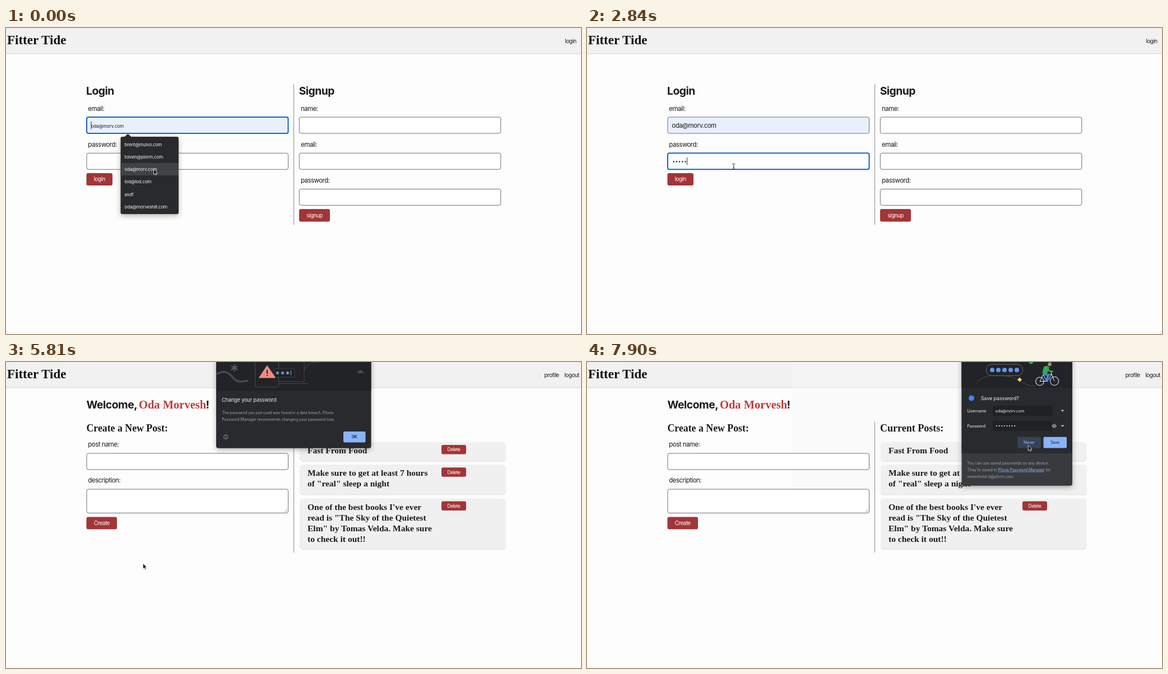
Recreate the animation shown at these times as an HTML page. Size 1026x546 px, loop 8000 ms.

```html
<!DOCTYPE html>
<html lang="en">
<head>
<meta charset="utf-8">
<title>Login demo</title>
<style>
html, body { margin: 0; width: 100%; height: 100%; overflow: hidden; background: #fdfdfd; }
svg {
  position: absolute; left: 0; top: 0; width: 1026px; height: 546px;
  font-family: Inter, Roboto, sans-serif; letter-spacing: -.03em; fill: #1a1a1a;
}
.serif { font-family: "Liberation Serif", serif; font-weight: 700; letter-spacing: 0; }
.bold { font-weight: 700; }
.mid { text-anchor: middle; }
.field { fill: #fff; stroke: #707070; stroke-width: 1; }
.filled { fill: #e8f0fe; }
.focus { stroke: #1266c4; stroke-width: 2; }
.popup { letter-spacing: -.01em; filter: drop-shadow(0 3px 5px rgba(0, 0, 0, .3)); }
.line { fill: none; stroke: #46494d; }
#breach { transform-origin: 513px 154px; }
</style>
</head>
<body>
<svg id="page"></svg>
<svg id="breach"></svg>
<svg id="top"></svg>
<script>
const LOOP = 8000;
const RED = '#a23538', BLUE = '#8ab4f8', DARK = '#202124', PANEL = '#292a2d', PALE = '#e8eaed', GREY = '#9aa0a6';
const EMAIL = 'oda@morv.com';
const $ = id => document.getElementById(id);

const text = (x, y, size, str, attrs = '') =>
  `<text x="${x}" y="${y}" font-size="${size}" ${attrs}>${str}</text>`;
const rect = (x, y, w, h, attrs = '') =>
  `<rect x="${x}" y="${y}" width="${w}" height="${h}" ${attrs}/>`;
const circle = (x, y, r, attrs = '') => `<circle cx="${x}" cy="${y}" r="${r}" ${attrs}/>`;
const path = (d, attrs = '') => `<path d="${d}" ${attrs}/>`;
const repeat = (n, make) => Array.from({ length: n }, (_, i) => make(i)).join('');

const serif = (x, y, size, str, attrs = '') => text(x, y, size, str, `class="serif" ${attrs}`);
const label = (x, y, str) => text(x, y, 11.4, str);
const heading = (x, y, str) => text(x, y, 19.3, str, 'class="bold"');
const field = (x, y, h = 29, attrs = '') =>
  rect(x, y, 359.5, h, `rx="3" class="field" ${attrs}`);
const button = (x, y, w, h, size, str, attrs = '') =>
  rect(x, y, w, h, `rx="3" fill="${RED}" ${attrs}`) +
  text(x + w / 2, y + h / 2 + size * .35, size, str, 'class="mid" fill="#fff"');
const divider = (y1, y2) => path(`M513.5 ${y1}V${y2}`, 'stroke="#8c8c8c"');

function header() {
  return rect(0, 0, 1026, 46, 'fill="#f1f1f1"') +
    path('M0 45.8H1026', 'stroke="#cfcfcf"') +
    rect(366, 0, 512, 235, 'id="haze" fill="#f8f8f8" opacity=".5"') +
    serif(2, 28.5, 23, 'Fitter Tide', 'fill="#111"');
}

function authPage() {
  return text(997.5, 26.6, 9.9, 'login') + divider(100, 351) +
    heading(143, 119, 'Login') +
    label(146.3, 147.5, 'email:') + field(144, 159, 29, 'id="email"') +
    text(151.5, 178, 8, EMAIL, 'id="preview" letter-spacing="-.01em"') +
    text(151.3, 177.6, 11.4, EMAIL, 'id="value"') +
    label(146.3, 211.7, 'password:') + field(144, 223.3, 29, 'id="password"') +
    `<g id="dots">${repeat(8, i => circle(154.6 + 5.2 * i, 238.6, 1.25))}</g>` +
    button(143.5, 259, 46.5, 22, 9.9, 'login', 'id="submit"') +
    rect(0, 0, .9, 13.5, 'id="caret"') +
    heading(522.7, 119, 'Signup') +
    ['name:', 'email:', 'password:'].map((name, i) =>
      label(526, 147.5 + 64.2 * i, name) + field(523.3, 159 + 64.2 * i)).join('') +
    button(523, 323, 55, 22.5, 9.9, 'signup');
}

function menu() {
  const items = ['brent@mulvo.com', 'tolven@plorm.com', EMAIL, 'lod@lod.com', 'asdf', 'oda@morveshill.com'];
  return `<g id="menu" class="popup">` +
    path('M211 194.5L217.5 189L224 194.5Z', `fill="${PANEL}"`) +
    rect(204.5, 194, 103.5, 138, `rx="3" fill="${PANEL}"`) +
    rect(204.5, 241, 103.5, 22, 'fill="#414245"') +
    items.map((s, i) => text(211.5, 211 + 22.15 * i, 8, s, 'fill="#f1f1f1"')).join('') + '</g>';
}

function post(y, h, lines) {
  return rect(524, y + 1, 368, h, 'rx="6" fill="#dcdcdc"') +
    rect(524, y, 368, h, 'rx="6" fill="#f0f0f0"') +
    lines.map((s, i) => serif(538, y + 20 + 19.1 * i, 15.5, s)).join('') +
    button(777, y + 5, 44, 16.5, 8.5, 'Delete');
}

function homePage() {
  return text(960.5, 26.6, 9.9, 'profile') + text(996.3, 26.6, 9.9, 'logout') + divider(107, 340) +
    heading(143.5, 82.7, 'Welcome,') +
    serif(237, 82.5, 20.5, 'Oda Morvesh', 'fill="#c23a3c"') + heading(356.5, 82.7, '!') +
    serif(143.5, 124, 17.8, 'Create a New Post:') +
    label(146.3, 151.3, 'post name:') + field(144, 163) +
    label(146.3, 215.4, 'description:') + field(144, 227, 42.5) +
    path('M497 268L502 263M500 268L502 266', 'stroke="#777" stroke-width=".7"') +
    button(143.5, 276.5, 54.5, 22, 9.9, 'Create') +
    serif(523, 124, 18, 'Current Posts:') +
    post(143, 33.5, ['Fast From Food']) +
    post(183.3, 53, ['Make sure to get at least 7 hours', 'of "real" sleep a night']) +
    post(243.5, 90, ["One of the best books I've ever", 'read is "The Sky of the Quietest',
      'Elm" by Tomas Velda. Make sure', 'to check it out!!']);
}

const star = (x, y, r, color, w) => path(repeat(3, i => {
  const a = Math.PI * (i / 3 + .5), dx = r * Math.cos(a), dy = r * Math.sin(a);
  return `M${x - dx} ${y - dy}L${x + dx} ${y + dy}`;
}), `stroke="${color}" stroke-width="${w}"`);

function breachDialog() {
  return `<g class="popup">` +
    rect(375, -8, 276.5, 161.7, `rx="4" fill="${PANEL}"`) + rect(375, 0, 276.5, 51.5, 'fill="#222326"') +
    star(407.5, 10.5, 6.5, '#5a5d61', 2.2) +
    path('M375 22C392 12 400 22 406 29S420 36 432 33', 'class="line" stroke-width="3.5"') +
    path('M444.5 -4V41Q444.5 45 448 45H483Q486.5 45 486.5 41V-4M486 35H532V-4M486 38.5H540M532 14Q538 -1 560 0', 'class="line"') +
    path('M627 20A5.5 5.5 0 0 1 638 20Z', 'fill="#46494d"') +
    rect(478, 12, 37, 15, 'rx="1" fill="#202124" stroke="#3c4043"') +
    path('M466 6.5L451.5 28H480.5Z', 'fill="#f28b82" stroke="#f28b82" stroke-linejoin="round"') +
    path('M466 14V21M466 23V25', `stroke="${DARK}" stroke-width="2"`) +
    repeat(3, i => star(484.5 + 9 * i, 19.5, 3, BLUE, 1.2)) + path('M508.5 15.5V23.5', `stroke="${BLUE}"`) +
    text(385, 71, 9.2, 'Change your password', `fill="${PALE}"`) +
    text(385.3, 93, 7, 'The password you just used was found in a data breach. Plovia', `fill="${GREY}"`) +
    text(385.3, 105.3, 7, 'Password Manager recommends changing your password now.', `fill="${GREY}"`) +
    circle(392.3, 133.7, 3.8, `fill="none" stroke="${GREY}" stroke-width=".9"`) +
    path('M392.3 133V136M392.3 131.3V132.2', `stroke="${GREY}"`) +
    rect(602, 124, 39.5, 19.5, `rx="2" fill="${BLUE}"`) +
    text(621.7, 136.3, 7, 'OK', `class="mid bold" fill="#25334d"`) + '</g>';
}

function cyclist() {
  return circle(808, 34.5, 7.3, 'fill="none" stroke="#aecbfa" stroke-width="1.3"') +
    circle(834, 34, 7.6, 'fill="none" stroke="#aecbfa" stroke-width="1.3"') +
    path('M808 34.5L814 23L829 22L834 34M814 23L821 35L829 22L828 17H832M808 34.5H821', 'fill="none" stroke="#e8eaed"') +
    path('M814 20L823 24L819 34', 'fill="none" stroke="#4285f4" stroke-width="3.5" stroke-linejoin="round"') +
    path('M812 20L815 9Q821 4 825 10L821 21Z', 'fill="#34a853"') +
    path('M821 11L825 16L831 17', 'fill="none" stroke="#34a853" stroke-width="2.5"') +
    circle(825.5, 4, 3.2, 'fill="#c58a70"') + path('M822 3Q825 -2 829 2Z', 'fill="#34a853"');
}

function saveDialog() {
  const down = y => path(`M845.8 ${y - 1.2}H851.2L848.5 ${y + 1.6}Z`, `fill="${PALE}"`);
  const input = y => rect(724, y, 107, 18, `rx="2" fill="${DARK}"`);
  return `<g id="save" class="popup">` +
    rect(668.5, -8, 197.5, 228.7, 'rx="4" fill="#393a3d"') +
    rect(668.5, 0, 197.5, 163, `fill="${PANEL}"`) + rect(668.5, 0, 197.5, 46, 'fill="#222326"') +
    path('M694 40C702 24 724 22 748 25S775 42 799 43', 'class="line"') +
    rect(712.5, 4, 65, 20.5, 'rx="10" fill="#222326" stroke="#6b6f74"') +
    repeat(5, i => circle(723 + 11 * i, 14.3, 4, 'fill="#5f97f0"')) +
    path('M772 27.5L776 31.5L772 35.5L768 31.5Z', 'fill="#fdd663"') +
    path('M789 0A3 3 0 0 0 796 0Z', 'fill="#34a853"') + cyclist() +
    circle(686, 64.5, 5, 'fill="#4285f4"') +
    text(702.7, 68, 9.1, 'Save password?', `fill="${PALE}"`) +
    text(678.3, 89.5, 7.3, 'Username', `fill="${PALE}"`) + input(78) + down(87) +
    text(728.6, 89.5, 7.2, EMAIL, `fill="${PALE}"`) +
    text(678.3, 116.5, 7.3, 'Password', `fill="${PALE}"`) + input(105) + down(114) +
    repeat(8, i => circle(731 + 4.6 * i, 114, 1.1, `fill="${PALE}"`)) +
    path('M829 114Q833.5 107 838 114Q833.5 121 829 114Z', `fill="${GREY}"`) +
    circle(833.5, 114, 1.7, `fill="${GREY}" stroke="${DARK}" stroke-width=".8"`) +
    rect(768.3, 134, 41.2, 19.2, 'id="never" rx="2" stroke="#3c4043" stroke-width=".8"') +
    text(788.8, 146.2, 7.2, 'Never', `class="mid" font-weight="500" fill="${BLUE}"`) +
    rect(814.5, 133.7, 41.5, 19.8, `rx="2" fill="${BLUE}"`) +
    text(835, 146.2, 7.2, 'Save', `class="mid" font-weight="500" fill="#25334d"`) +
    text(678.3, 182.5, 7.1, 'You can use saved passwords on any device.', `fill="${GREY}"`) +
    text(678.3, 194.7, 7.1, `They're saved to <tspan fill="${BLUE}" text-decoration="underline">Plovia Password Manager</tspan> for`, `fill="${GREY}"`) +
    text(678.3, 207, 7.1, 'marenholst.ti@plorm.com.', `fill="${GREY}"`) + '</g>';
}

$('page').innerHTML = header() + `<g id="auth">${authPage()}${menu()}</g><g id="home">${homePage()}</g>`;
$('breach').innerHTML = breachDialog();
$('top').innerHTML = saveDialog() + '<g id="cursor">' +
  path('M0 0V9.7L2.2 7.7L3.6 10.9L5.2 10.2L3.8 7.1H6.8Z', 'id="arrow" fill="#000" stroke="#fff" stroke-width=".8"') +
  path('M-2.6 -5Q0 -5 0 -3.4Q0 -5 2.6 -5M0 -3.4V3.4M-2.6 5Q0 5 0 3.4Q0 5 2.6 5M-1.2 1.8H1.2',
    'id="beam" fill="none" stroke="#222" stroke-width=".9"') + '</g>';

// time, x, y, shape
const POINTER = [
  [0, 263.7, 251.7, 'arrow'], [600, 264, 253, 'beam'], [890, 263, 250, 'beam'], [1040, 261.7, 247, 'beam'],
  [4030, 250, 262, 'arrow'], [4180, 215, 284, 'arrow'], [4330, 180, 283, 'arrow'], [4480, 165.7, 272.3, 'arrow'],
  [5510, 190, 305, 'arrow'], [5660, 217, 335, 'arrow'], [5810, 244.6, 359.5, 'arrow'], [5960, 330, 415, 'arrow'],
  [6110, 440, 428, 'arrow'], [6260, 550, 395, 'arrow'], [6400, 645, 300, 'arrow'], [6550, 678, 200, 'arrow'],
  [6700, 645, 145, 'arrow'], [6850, 625, 133, 'arrow'], [7000, 660, 128, 'arrow'], [7150, 767.8, 107.5, 'arrow'],
  [7300, 778, 117, 'arrow'], [7450, 784, 128, 'arrow'], [7600, 786, 138, 'arrow'], [7750, 787, 145, 'arrow'],
  [7900, 787.3, 148.5, 'arrow']
];
const KEYS = [1940, 2240, 2390, 2690, 2840, 3140, 3430, 3580];
const MENU_FADE = [[0, 1], [450, .5], [600, 0]];
// time, opacity, lift, tilt
const BREACH = [[0, 0, 0, 0], [5510, .5, 0, 0], [5660, 1, 0, 0], [7000, .75, -5, 4], [7150, .4, -9, 8], [7300, .15, -13, 11], [7450, 0, 0, 0]];
const CARET_OFF = [[1790, 1940], [4030, 4480], [4620, LOOP]];

const at = (table, t) => table.findLast(row => row[0] <= t);
const show = (id, on) => { $(id).style.display = on ? '' : 'none'; };

function render(t) {
  const typed = KEYS.filter(k => k <= t).length;
  const picked = t >= 450, inPassword = t >= 1190;

  show('auth', t < 5210);
  show('home', t >= 5210);
  show('haze', t >= 6700);
  show('preview', !picked);
  show('value', picked);
  $('email').setAttribute('class', 'field filled' + (inPassword ? '' : ' focus'));
  $('password').setAttribute('class', 'field' + (inPassword && t < 4620 ? ' focus' : ''));
  $('submit').setAttribute('fill', t >= 4480 ? '#89272b' : RED);
  [...$('dots').children].forEach((dot, i) => { dot.style.display = i < typed ? '' : 'none'; });

  show('caret', !CARET_OFF.some(([from, to]) => t >= from && t < to));
  const emailEnd = picked && t < 5210 ? 151.5 + $('value').getComputedTextLength() : 151.6;
  $('caret').setAttribute('x', inPassword ? 152 + 5.2 * typed : emailEnd);
  $('caret').setAttribute('y', inPassword ? 231 : 167);

  $('menu').style.opacity = at(MENU_FADE, t)[1];
  const [, alpha, lift, tilt] = at(BREACH, t);
  $('breach').style.opacity = alpha;
  $('breach').style.transform = tilt ? `translateY(${lift}px) perspective(500px) rotateX(${tilt}deg)` : 'none';
  show('save', t >= 7000);
  $('never').setAttribute('fill', t >= 7750 ? '#364257' : PANEL);

  const [, x, y, shape] = at(POINTER, t);
  $('cursor').setAttribute('transform', `translate(${x} ${y})`);
  show('arrow', shape === 'arrow');
  show('beam', shape === 'beam');
}

const start = performance.now();
function tick() {
  render((performance.now() - start) % LOOP);
  requestAnimationFrame(tick);
}
tick();
</script>
</body>
</html>
```
